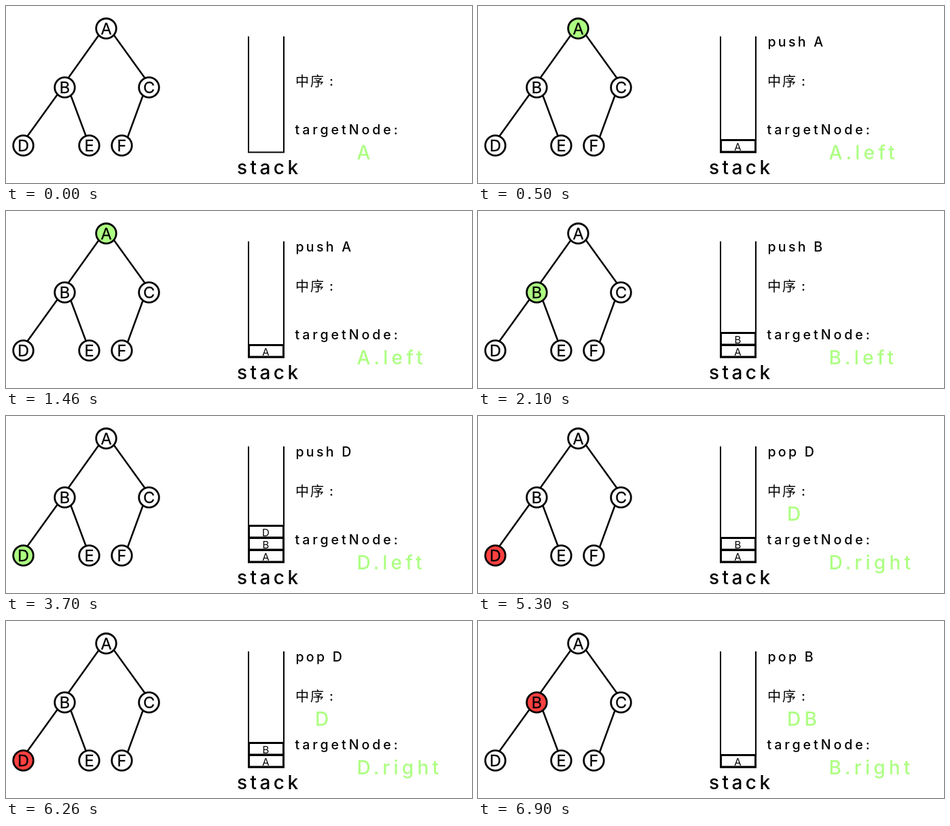
These frames come from a looping animation (686 by 262 pixels, 8 s). An HTML page:

```html
<!DOCTYPE html>
<html lang="zh">
<head>
<meta charset="utf-8">
<title>Inorder traversal with a stack</title>
<style>
  html, body { margin: 0; width: 100%; height: 100%; overflow: hidden; background: #fff; }
  svg { display: block; width: 100%; height: 100%; }
  text { font-family: Inter, Lato, sans-serif; font-weight: 500; white-space: pre; }
  .line { fill: none; stroke: #000; stroke-linecap: round; }
  .node { font-size: 23.5px; text-anchor: middle; font-weight: 400; stroke: #000; stroke-width: .3; }
  .cell { font-size: 15px; text-anchor: middle; font-weight: 400; }
  .note { font-size: 19.5px; letter-spacing: 3.3px; }
  .label { font-size: 19.5px; letter-spacing: 4px; }
  .han { font: 500 20px "Noto Sans CJK SC", "Noto Sans CJK", sans-serif; letter-spacing: 2px; }
  .title { font-size: 28px; letter-spacing: 4.4px; }
  .value { font-size: 28px; letter-spacing: 5.2px; fill: #adff82; }
</style>
</head>
<body>
<svg id="stage" viewBox="0 0 686 262"></svg>
<script>
const GREEN = '#adff82', RED = '#ff4040', LOOP = 8000;

const nodes = {
  A: [147.5, 33.3], B: [86.5, 120.5], C: [210.5, 120.5],
  D: [25.5, 206.5], E: [122.5, 206.5], F: [170.5, 206.5]
};
const edges = 'M136 44L92 106M159.5 44L204 106M75 132L32 192M96 134L117.5 192M201 134L179.5 193';

const steps = [
  { at: 0,    note: '',       stack: '',    out: '',   target: 'A' },
  { at: 500,  note: 'push A', stack: 'A',   out: '',   target: 'A.left',  node: 'A', color: GREEN },
  { at: 2100, note: 'push B', stack: 'AB',  out: '',   target: 'B.left',  node: 'B', color: GREEN },
  { at: 3700, note: 'push D', stack: 'ABD', out: '',   target: 'D.left',  node: 'D', color: GREEN },
  { at: 5300, note: 'pop D',  stack: 'AB',  out: 'D',  target: 'D.right', node: 'D', color: RED },
  { at: 6900, note: 'pop B',  stack: 'A',   out: 'DB', target: 'B.right', node: 'B', color: RED }
];

const stage = document.getElementById('stage');

function add(tag, attrs, parent = stage) {
  const el = document.createElementNS('http://www.w3.org/2000/svg', tag);
  for (const key in attrs) el.setAttribute(key, attrs[key]);
  parent.appendChild(el);
  return el;
}

function write(x, y, cls, str = '') {
  const el = add('text', { x, y, class: cls });
  el.textContent = str;
  return el;
}

// Tree
add('path', { d: edges, class: 'line', 'stroke-width': 2.5 });
const discs = {};
for (const [name, [cx, cy]] of Object.entries(nodes)) {
  discs[name] = add('circle', { cx, cy, r: 14.8, fill: '#fff', stroke: '#000', 'stroke-width': 2.8 });
  write(cx, cy + 8.5, 'node', name);
}

// Stack
add('path', { d: 'M357 45V216.5H409V45', class: 'line', 'stroke-width': 2, style: 'stroke-linecap:butt' });
write(340, 249, 'title', 'stack');
const cells = [0, 1, 2].map(i => {
  const y = 198.5 - 18 * i;
  const rect = add('rect', { x: 357.5, y, width: 51, height: 17.5, class: 'line', 'stroke-width': 3 });
  return { rect, label: write(382.5, y + 15, 'cell') };
});

// Captions
write(425.5, 190, 'label', 'targetNode:');
write(426, 118.5, 'han', '中序');
write(476, 118, 'label', ':');
const note = write(426.5, 60, 'note');
const out = write(455, 155, 'value');
const target = write(516.5, 227, 'value');

function show(step) {
  note.textContent = step.note;
  out.textContent = step.out;
  target.textContent = step.target;
  for (const name in discs) {
    discs[name].setAttribute('fill', name === step.node ? step.color : '#fff');
  }
  cells.forEach(({ rect, label }, i) => {
    rect.style.display = i < step.stack.length ? '' : 'none';
    label.textContent = step.stack[i] || '';
  });
}

const start = performance.now();
let shown;

function tick() {
  const t = (performance.now() - start) % LOOP;
  const step = steps.findLast(s => s.at <= t);
  if (step !== shown) show(shown = step);
  requestAnimationFrame(tick);
}
tick();
</script>
</body>
</html>
```
